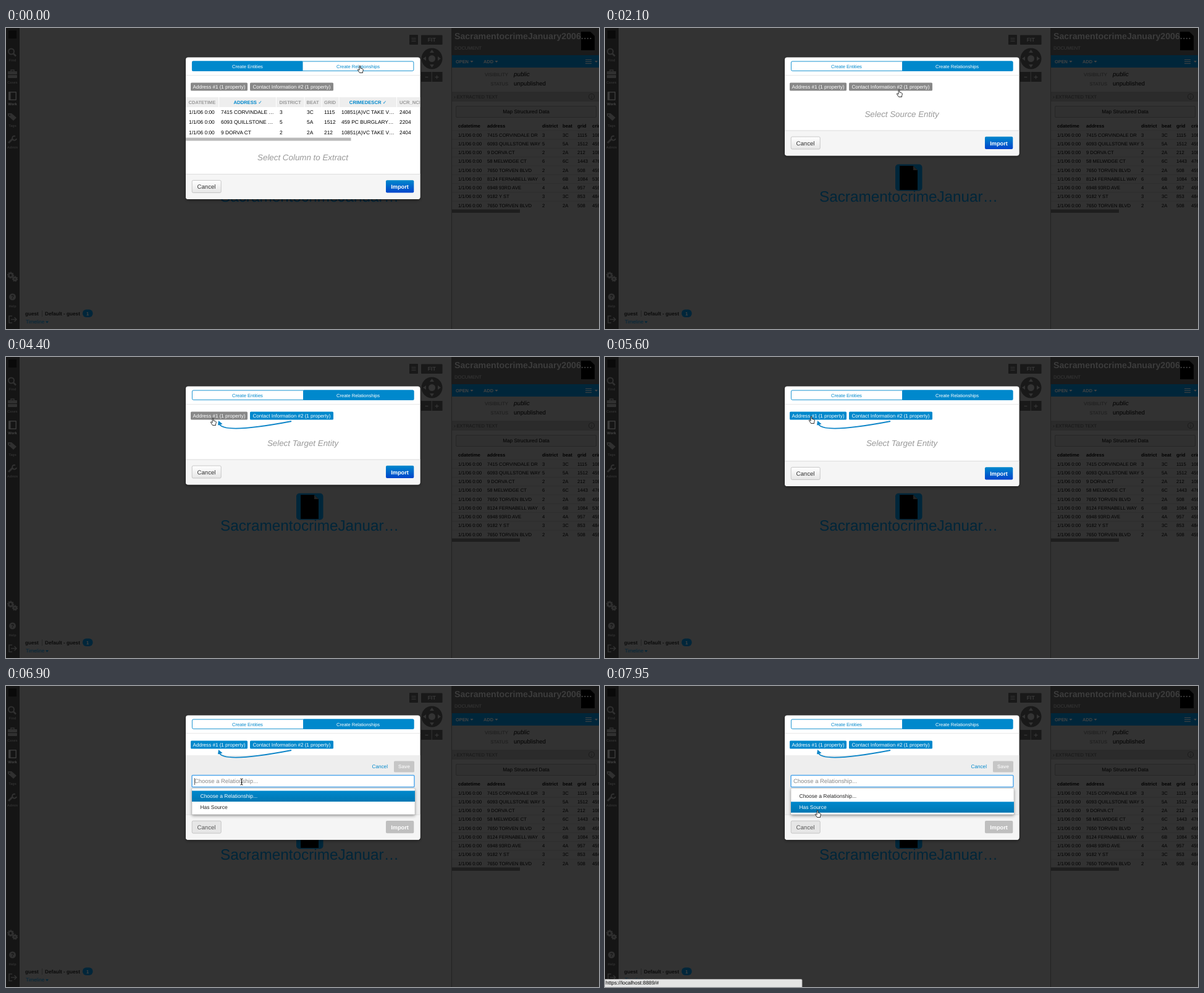
Animation, 960 px wide and 487 px high, one loop 8000 ms. Source, as an HTML page:

```html
<!DOCTYPE html>
<html lang="en">
<head>
<meta charset="utf-8">
<title>Relationship mapping dialog</title>
<style>
  html, body { margin: 0; width: 100%; height: 100%; overflow: hidden; background: #333; }
  svg { display: block; width: 100%; height: 100%; }
  text { font-family: "Liberation Sans", "DejaVu Sans", sans-serif; text-rendering: geometricPrecision; white-space: pre; }
</style>
</head>
<body>
<svg id="stage" viewBox="0 0 960 487" preserveAspectRatio="none"></svg>
<script>
const BLUE = '#0088cc', DIM_BLUE = '#00263a', DIM = '#333', SHADE = '#191919';
const stage = document.getElementById('stage');

// Markup helpers
const text = (s, x, y, size, fill = '#000', more = '') =>
  `<text x="${x}" y="${y}" font-size="${size}" fill="${fill}" ${more}>${s}</text>`;
const rect = (x, y, w, h, fill, more = '') =>
  `<rect x="${x}" y="${y}" width="${w}" height="${h}" fill="${fill}" ${more}/>`;
const path = (d, fill = 'none', more = '') => `<path d="${d}" fill="${fill}" ${more}/>`;
const circle = (x, y, r, fill, more = '') => `<circle cx="${x}" cy="${y}" r="${r}" fill="${fill}" ${more}/>`;
const group = (id, body, more = '') => `<g id="${id}" ${more}>${body}</g>`;
const caret = (x, y, fill) => path(`M${x} ${y}h5l-2.5 3z`, fill);
const BOLD = 'font-weight="700"', MID = 'text-anchor="middle"', END = 'text-anchor="end"', ITALIC = 'font-style="italic"';
const stroke = (color, width = 1) => `stroke="${color}" stroke-width="${width}"`;

function sidebar() {
  const ink = '#303030';
  const label = (s, y) => text(s, 10.5, y, 5.6, ink, MID + ' ' + BOLD);
  const gear = (x, y, r) => circle(x, y, r, 'none', stroke(ink, 2.6)) +
    circle(x, y, r + 1.6, 'none', stroke(ink, 1.4) + ' stroke-dasharray="2 1.6"');
  return rect(0, 0, 22, 487, '#151515') +
    rect(4, 4, 13, 13, '#0a0a0a') +
    circle(8.5, 38, 4.5, 'none', stroke(ink, 2)) + path('M12 41.5l4 4', 'none', stroke(ink, 2.6)) + label('Find', 54) +
    path('M8 70v-2h5v2', 'none', stroke(ink, 1.5)) + rect(3, 70, 15, 5, ink, 'rx="1"') + rect(3, 76, 15, 5, ink, 'rx="1"') + label('Cases', 90) +
    rect(4, 103, 13, 14, '#3a3a3a', 'rx="1"') + rect(7.5, 104.5, 8, 11, '#151515') + text('Work', 10.5, 125, 5.8, '#484848', MID + ' ' + BOLD) +
    path('M3 138h6l8 7-5 5-9-8z', ink) + circle(6, 141, 1, '#151515') + label('Tags', 160) +
    path('M4 186l7-7', 'none', stroke(ink, 3)) + path('M15 175a3.5 3.5 0 1 0 2 4', 'none', stroke(ink, 2)) + label('Admin', 195) +
    gear(7.5, 400, 3.2) + gear(14.5, 406, 2.4) +
    circle(10.5, 435, 5.5, ink) + text('?', 10.5, 438, 8.5, '#151515', MID + ' ' + BOLD) + label('Help', 452) +
    path('M10 466H5v11h5M8 471.500h9m-3.500-3.500l3.500 3.500-3.500 3.500', 'none', stroke(ink, 1.6));
}

function graph() {
  const arrows = [0, 90, 180, 270].map(a =>
    path('M689.500 35l3.500 5h-7z', DIM, `transform="rotate(${a} 689.500 49.500)"`)).join('');
  return rect(653, 11, 14, 16, SHADE, 'rx="1"') + path('M656.500 16.500h7m-7 2.500h7m-7 2.500h7', 'none', stroke(DIM)) +
    rect(672, 11.5, 34.5, 15.5, SHADE, 'rx="1"') + text('FIT', 689.3, 22.4, 8.7, '#3a3a3a', MID + ' ' + BOLD) +
    circle(689.5, 49.5, 17, SHADE) + arrows + circle(689.5, 49.5, 5.5, DIM) +
    rect(672, 71, 16.7, 16, SHADE) + rect(689.7, 71, 16.8, 16, SHADE) +
    path('M678.500 79.500h5m11 0h6m-3-3v6', 'none', stroke(DIM, 1.3)) +
    rect(470, 220.5, 43.5, 43, DIM_BLUE, 'rx="5"') + path('M477 223h22l7 7v32h-29z', '#000') + path('M499 223v7h7z', '#222') +
    text('SacramentocrimeJanuar…', 347, 281, 24.3, DIM_BLUE) +
    text('guest', 31, 464.7, 8.2, '#0b0b0b', BOLD) + path('M58.500 457v10', 'none', stroke('#222', .8)) +
    text('Default - guest', 63, 464.7, 8.2, '#0b0b0b', BOLD) +
    rect(124, 455.5, 16.5, 12.5, DIM_BLUE, 'rx="6"') + text('1', 132.2, 464.6, 7.6, '#444', MID + ' ' + BOLD) +
    text('Timeline', 32, 478.3, 8.1, DIM_BLUE) + caret(64, 474.5, DIM_BLUE);
}

const crimes = [
  ['7415 CORVINDALE DR', 3, '3C', 1115, '10851(A)VC'],
  ['6093 QUILLSTONE WAY', 5, '5A', 1512, '459 PC'],
  ['9 DORVA CT', 2, '2A', 212, '10851(A)VC'],
  ['58 MELWIDGE CT', 6, '6C', 1443, '476 PC'],
  ['7650 TORVEN BLVD', 2, '2A', 508, '459 PC'],
  ['8124 FERNABELL WAY', 6, '6B', 1084, '530.5 PC'],
  ['6948 93RD AVE', 4, '4A', 957, '459 PC'],
  ['9182 Y ST', 3, '3C', 853, '484 PC'],
  ['7650 TORVEN BLVD', 2, '2A', 508, '459 PC'],
];
const DATE = '1/1/06 0:00';

function inspector() {
  const columns = [732, 779, 868, 901, 925, 949];
  const line = (cells, y, more) => cells.map((c, i) => text(c, columns[i], y, 7.65, '#000', more)).join('');
  return rect(721, 0, 239, 487, '#323232') + rect(721, 0, 239, 44, '#1b1b1b') +
    path('M931 6h15l7 7v23h-22z', '#000') +
    text('SacramentocrimeJanuary2006.…', 726, 18, 14.18, '#3c3c3c', BOLD) +
    text('DOCUMENT', 726, 35.2, 7.6, '#3a3a3a') +
    rect(721, 44, 239, 20, DIM_BLUE) +
    text('OPEN', 728, 57, 7.4, '#444', BOLD) + caret(751.5, 53, '#444') +
    text('ADD', 773, 57, 7.4, '#444', BOLD) + caret(791.5, 53, '#444') +
    path('M938 51.500h10m-10 3h10m-10 3h10', 'none', stroke('#444', 1.2)) + caret(953, 53, '#444') +
    text('VISIBILITY', 813, 77.7, 7.7, '#1b1b1b', END) + text('public', 822, 78.3, 9.8, '#000', ITALIC) +
    text('STATUS', 813, 92.7, 7.5, '#1b1b1b', END) + text('unpublished', 822, 93.3, 9.65) +
    rect(721, 103, 239, 16, '#2b2b2b') + text('› EXTRACTED TEXT', 725, 113.8, 7.5, '#161616') +
    circle(948, 111, 4.6, 'none', stroke('#191919', .8)) + text('i', 948, 113.6, 7, '#191919', MID) +
    rect(728.5, 126.5, 227, 18, '#303030', 'rx="1.5" ' + stroke('#242424', .8)) + text('Map Structured Data', 842, 138.4, 8.2, '#000', MID) +
    line(['cdatetime', 'address', 'district', 'beat', 'grid', 'crimedescr'], 161.2, BOLD) +
    crimes.map((row, i) => path(`M722 ${166 + i * 14.25}h238`, 'none', stroke('#2c2c2c', .7)) +
      line([DATE, ...row], 175.7 + i * 14.25)).join('') +
    rect(722, 293.5, 110, 5.5, '#1e1e1e') + path('M721.500 44v443', 'none', stroke('#222'));
}

function entityTable() {
  const heads = [['CDATETIME', 295.5], ['DISTRICT', 442.5], ['BEAT', 486.5], ['GRID', 515], ['UCR_NCIC', 637]];
  const columns = [296, 348, 443, 487, 515, 543, 637];
  const rows = [
    [DATE, '7415 CORVINDALE …', 3, '3C', 1115, '10851(A)VC TAKE V…', 2404],
    [DATE, '6093 QUILLSTONE …', 5, '5A', 1512, '459 PC BURGLARY…', 2204],
    [DATE, '9 DORVA CT', 2, '2A', 212, '10851(A)VC TAKE V…', 2404],
  ];
  return rect(291, 112, 379.5, 16, '#eee') +
    [344.5, 437.5, 483, 511, 539, 632.5].map(x => path(`M${x} 112v16`, 'none', stroke('#fff'))).join('') +
    heads.map(([s, x]) => text(s, x, 122.8, 7.6, '#999', BOLD)).join('') +
    text('ADDRESS ✓', 391.5, 122.8, 7.7, BLUE, MID + ' ' + BOLD) + text('CRIMEDESCR ✓', 586, 122.8, 7.7, BLUE, MID + ' ' + BOLD) +
    rows.map((row, r) => row.map((c, i) => text(c, columns[i], 139 + r * 16.3, 8.35)).join('')).join('') +
    rect(291, 177.5, 267.5, 5, '#b9b9b9') +
    text('Select Column to Extract', 480.5, 214.3, 13.35, '#999', MID + ' ' + ITALIC);
}

function dialog() {
  const chip = (id, x, w, s) => rect(x, 88.5, w, 13, '#888', `id="${id}" rx="1.5"`) + text(s, x + w / 2, 97.9, 8.1, '#fff', MID);
  const form = rect(291, 112, 379.5, 140, '#eee') +
    text('Cancel', 592.5, 133, 8.2, BLUE) +
    rect(628, 121.5, 33, 18, '#c6c6c6', 'rx="1.500"') + text('Save', 644.5, 133.2, 8.2, '#f1f1f1', MID + ' ' + BOLD) +
    rect(301, 144.5, 360, 19, '#fff', 'id="field" rx="1.500"') + text('Choose a Relationship...', 305, 157.3, 9.45, '#888') +
    path('M305.500 149v11', 'none', 'id="typingCaret" ' + stroke('#333', .8));
  const footer = rect(291, 0, 379.5, 41, '#f5f5f5') + path('M291 .500h379.500', 'none', stroke('#ddd')) +
    rect(301.2, 10.5, 47, 20, 'url(#grayFade)', 'id="cancelBox" rx="2" ' + stroke('#bbb', .8)) +
    text('Cancel', 324.5, 24, 9.6, '#333', 'id="cancelLabel" ' + MID) +
    rect(615, 10.3, 45.3, 20.3, 'url(#blueFade)', 'id="importBox" rx="2"') +
    text('Import', 637.5, 24, 9.2, '#fff', MID + ' ' + BOLD);
  return rect(291, 47.5, 379.5, 0, '#fff', 'id="card" rx="4" filter="url(#soft)"') +
    group('inner',
      path('M291 76.500h379.500', 'none', stroke('#e8e8e8')) +
      rect(301.4, 54, 358.5, 15.3, '#fff', 'rx="2" ' + stroke(BLUE, .9)) +
      rect(301, 53.6, 179.5, 16.1, BLUE, 'id="activeTab" rx="1.500"') +
      text('Create Entities', 391, 64.5, 7.6, '#fff', 'id="entityTab" ' + MID) +
      text('Create Relationships', 570, 64.5, 7.55, BLUE, 'id="relationTab" ' + MID) +
      group('table', entityTable()) + text('', 480.5, 144, 13.35, '#999', 'id="hint" ' + MID + ' ' + ITALIC) +
      group('form', form) +
      chip('addressChip', 299, 92, 'Address #1 (1 property)') +
      chip('contactChip', 395, 135, 'Contact Information #2 (1 property)') +
      group('connector', path('', 'none', 'id="wire" ' + stroke('#0f86c8', 2)) + path('M-1 -4.500l6.500 5.500-7.500 2z', '#0f86c8', 'id="wireHead"')) +
      group('footer', footer), 'clip-path="url(#cardClip)"') +
    group('menu',
      rect(301, 165.5, 361, 42.5, '#fff', 'filter="url(#soft)"') + rect(301, 165.5, 361, 42.5, '#fff', stroke('#bbb', .6)) +
      rect(301, 169.5, 361, 17.6, 'url(#itemFade)', 'id="activeItem"') +
      text('Choose a Relationship...', 314.5, 181.2, 8.5, '#fff', 'id="itemChoose"') + text('Has Source', 314.5, 199, 8.45, '#222', 'id="itemSource"'));
}

const fade = (id, a, b) => `<linearGradient id="${id}" x2="0" y2="1"><stop stop-color="${a}"/><stop offset="1" stop-color="${b}"/></linearGradient>`;
const outlined = 'stroke-linejoin="round" ' + stroke('#000', .8);
stage.innerHTML = `<defs>${fade('grayFade', '#fff', '#e6e6e6')}${fade('blueFade', '#0088cc', '#0044cc')}${fade('itemFade', '#0088cc', '#0077b3')}
  <filter id="soft" x="-10%" y="-20%" width="120%" height="140%"><feDropShadow dx="0" dy="2" stdDeviation="2.500" flood-opacity=".4"/></filter>
  <clipPath id="cardClip"><rect id="clipCard" x="291" y="47.5" width="379.5" height="0" rx="4"/></clipPath></defs>` +
  rect(0, 0, 960, 487, DIM) + graph() + inspector() + sidebar() + dialog() +
  group('status', rect(-1, 474.5, 320, 14, '#e4e4e4', 'rx="1.500" ' + stroke('#aaa', .8)) + text('https://localhost:8889/#', 1, 483.2, 8.4)) +
  group('pointer',
    group('hand', path('M-.900 .500q.900-1 1.800 0v3.500l3.600 1.200q1 .500 .800 1.800l-.800 2.800v1.700h-5l-3.200-4.800q.300-1.300 1.500-.500l1.300 1z', '#fff', outlined)) +
    group('arrow', path('M0 0v9.500l2.200-2 1.500 3.400 1.700-.800-1.500-3.200h3z', '#000', stroke('#fff', .7))) +
    group('beam', path('M-2-5q2 0 2 1.500v7q0 1.500-2 1.500M2-5q-2 0-2 1.500v7q0 1.500 2 1.500M-1.200 1h2.400', 'none', stroke('#000', 1))));

const el = {};
stage.querySelectorAll('[id]').forEach(node => el[node.id] = node);
const set = (id, attributes) => { for (const k in attributes) el[id].setAttribute(k, attributes[k]); };
const show = (id, on) => set(id, { display: on ? 'inline' : 'none' });
const ease = p => (p = Math.min(1, Math.max(0, p)), p * p * (3 - 2 * p));
const mix = (a, b, p) => a + (b - a) * p;

// Pointer stops: time, x, y of the hot spot
const stops = [[0, 573, 61], [900, 573, 61], [1900, 476, 100], [2750, 476, 100], [3350, 422, 102.5],
  [3900, 335, 99], [4800, 335, 99], [5300, 334, 96], [6000, 334, 96], [6600, 381.5, 155], [7250, 381.5, 155], [7850, 344, 201], [8000, 344, 201]];
const OPEN_TAB = 350, PICK_SOURCE = 2450, PICK_TARGET = 5540, OPEN_MENU = 6870, LOOP = 8000;

function pointerAt(t) {
  const i = stops.findIndex(s => s[0] > t), a = stops[i - 1], b = stops[i];
  const p = ease((t - a[0]) / (b[0] - a[0]));
  return [mix(a[1], b[1], p), mix(a[2], b[2], p)];
}

function draw(t) {
  const [x, y] = pointerAt(t);
  const relations = t >= OPEN_TAB, sourced = t >= PICK_SOURCE, targeted = t >= PICK_TARGET, menu = t >= OPEN_MENU;
  const form = t >= PICK_TARGET + 75;

  let footerY = mix(236, 165.5, ease((t - OPEN_TAB) / 250));
  if (targeted) footerY = mix(165.5, 207.7, ease((t - PICK_TARGET) / 420));
  set('card', { height: footerY - 6.5 });
  set('clipCard', { height: footerY - 6.5 });
  set('footer', { transform: `translate(0 ${footerY})` });

  set('activeTab', { x: relations ? 481 : 301 });
  set('entityTab', { fill: relations ? BLUE : '#fff' });
  set('relationTab', { fill: relations ? '#fff' : BLUE });
  show('table', !relations);
  show('hint', relations && !form);
  el.hint.textContent = sourced ? 'Select Target Entity' : 'Select Source Entity';
  set('contactChip', { fill: sourced ? BLUE : '#888' });
  set('addressChip', { fill: targeted ? BLUE : '#888' });

  const inChips = y >= 88.5 && y <= 101.5;
  const overAddress = inChips && x < 391;
  const [endX, endY] = targeted || overAddress ? [345, 107.5] : [x + 2, y + 5];
  show('connector', sourced);
  set('wire', { d: `M462 104C${mix(462, endX, .36)} 112 ${endX + 5} ${endY + 16} ${endX} ${endY}` });
  set('wireHead', { transform: `translate(${endX} ${endY})` });

  show('form', form);
  set('field', { stroke: menu ? '#52a8ec' : '#ccc', 'stroke-width': menu ? 1.5 : .8 });
  show('typingCaret', menu && (t - OPEN_MENU) % 1200 < 600);
  set('cancelBox', { fill: form ? '#e6e6e6' : 'url(#grayFade)' });
  set('cancelLabel', { fill: form ? '#555' : '#333' });
  set('importBox', { fill: form ? '#bfbfbf' : 'url(#blueFade)' });

  const onSource = menu && y > 187;
  show('menu', menu);
  set('activeItem', { y: onSource ? 187.3 : 169.5 });
  set('itemChoose', { fill: onSource ? '#222' : '#fff' });
  set('itemSource', { fill: onSource ? '#fff' : '#222' });
  show('status', t >= 7750);

  const beam = form && y > 144 && y < 164;
  const hand = y < 70 || inChips || menu && y > 168;
  set('pointer', { transform: `translate(${x} ${y})` });
  show('beam', beam);
  show('hand', hand && !beam);
  show('arrow', !hand && !beam);
}

const start = performance.now();
function tick() {
  draw((performance.now() - start) % LOOP);
  requestAnimationFrame(tick);
}
tick();
</script>
</body>
</html>
```
